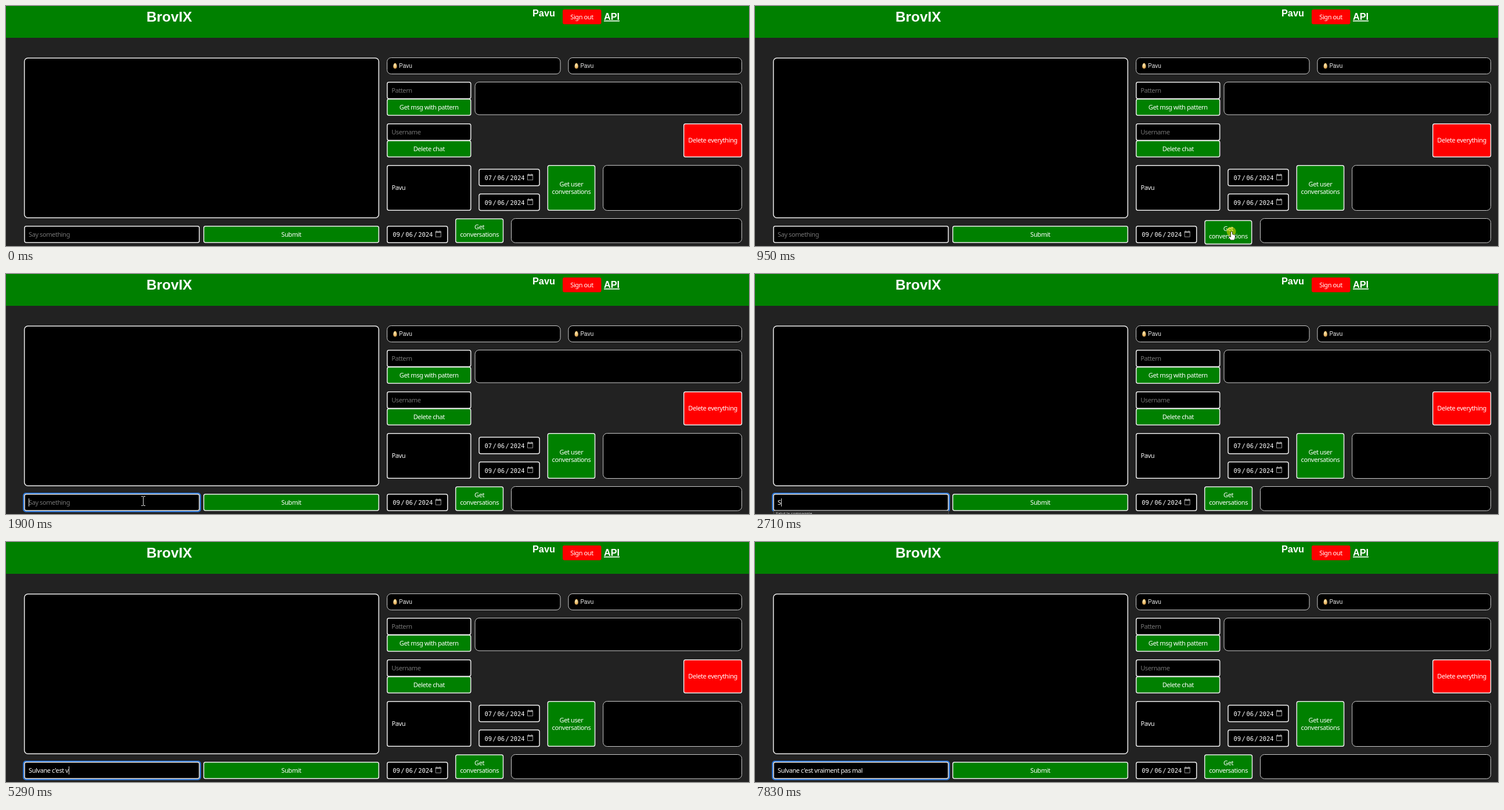
An HTML page with a canvas for the animation above (8000 ms loop, 1280 px wide and 415 px high).

```html
<!DOCTYPE html>
<html lang="en">
<head>
<meta charset="utf-8">
<title>Chat</title>
<style>
html, body { margin: 0; width: 1280px; height: 415px; overflow: hidden; background: #222; }
canvas { display: block; }
</style>
</head>
<body>
<canvas id="stage" width="1280" height="415"></canvas>
<script>
const ctx = document.getElementById('stage').getContext('2d');
const LOOP = 8000;
const GREEN = '#008000', RED = '#ff0000', GREY = '#757575', WHITE = '#fff';
const UI = '11px "Noto Sans", "Open Sans", sans-serif';
const SANS = '"Liberation Sans", Arial, sans-serif';
const MONO = '10.4px "DejaVu Sans Mono", monospace';
const USER = 'Pavu';

const MESSAGE = "Sulvane c'est vraiment pas mal";
const KEY_TIMES = [
  2640, 2840, 3040, 3240, 3440, 3570, 3900, 4030, 4230, 4430,
  4560, 4690, 4890, 5090, 5220, 5420, 5620, 5820, 6020, 6240,
  6370, 6570, 6770, 6970, 7090, 7210, 7330, 7450, 7570, 7700
];
const FOCUS = 1830, TYPING = KEY_TIMES[0];

function box(x1, y1, x2, y2, { fill = '#000', r = 3, lw = 1.5, line = '#eee' } = {}) {
  ctx.beginPath();
  ctx.roundRect(x1, y1, x2 - x1, y2 - y1, r);
  ctx.fillStyle = fill;
  ctx.fill();
  if (!lw) return;
  ctx.lineWidth = lw;
  ctx.strokeStyle = line;
  ctx.stroke();
}

function text(str, x, y, { color = WHITE, font = UI, align = 'left' } = {}) {
  ctx.font = font;
  ctx.letterSpacing = font === UI ? '-0.4px' : '0px';
  ctx.textAlign = align;
  ctx.fillStyle = color;
  ctx.fillText(str, x, y);
}

function button(x1, y1, x2, y2, lines, fill = GREEN) {
  box(x1, y1, x2, y2, { fill });
  const mid = (y1 + y2) / 2 + 4 - (lines.length - 1) * 6.5;
  lines.forEach((s, i) => text(s, (x1 + x2) / 2, Math.round(mid + i * 13), { align: 'center' }));
}

function field(x, y, hint) {
  box(x, y, x + 144, y + 28.5);
  text(hint, x + 7.5, y + 18.5, { color: GREY });
}

const panel = (x1, y1, x2, y2) => box(x1, y1, x2, y2, { r: 7, lw: 1, line: '#ccc' });

function dateField(x, y, day) {
  box(x, y, x + 104, y + 28.5);
  const base = y + 18.5, opt = { font: MONO };
  text(day, x + 9.5, base, opt);
  text('06', x + 31.5, base, opt);
  text('2024', x + 53.5, base, opt);
  text('/', x + 23.5, base, opt);
  text('/', x + 45.5, base, opt);
  const cx = x + 83, cy = y + 9;
  ctx.strokeStyle = '#999';
  ctx.lineWidth = 1;
  ctx.strokeRect(cx + 0.5, cy + 0.5, 9, 9);
  ctx.fillStyle = '#999';
  ctx.fillRect(cx, cy, 10, 2.5);
  ctx.fillRect(cx + 1.5, cy - 1.2, 1.5, 2);
  ctx.fillRect(cx + 7, cy - 1.2, 1.5, 2);
}

function eggUser(x1, x2) {
  panel(x1, 89.5, x2, 117.5);
  const x = x1 + 13.8, y = 103.5;
  const g = ctx.createRadialGradient(x - 1, y - 2, 0.5, x, y, 5.5);
  g.addColorStop(0, '#ffe7b0');
  g.addColorStop(0.6, '#e8b765');
  g.addColorStop(1, '#b57f35');
  ctx.fillStyle = g;
  ctx.beginPath();
  ctx.moveTo(x, y - 5);
  ctx.bezierCurveTo(x + 3, y - 5, x + 5.2, y + 5, x, y + 5);
  ctx.bezierCurveTo(x - 5.2, y + 5, x - 3, y - 5, x, y - 5);
  ctx.fill();
  text(USER, x1 + 20.5, 107, { font: '10px ' + SANS, color: '#eee' });
}

function header() {
  ctx.fillStyle = GREEN;
  ctx.fillRect(0, 0, 1280, 55);
  const bold = px => ({ font: `bold ${px}px ${SANS}` });
  text('BrovIX', 242, 27, bold(24.4));
  text(USER, 907, 18, bold(16.3));
  box(959, 6, 1025.5, 31.5, { fill: RED, lw: 0 });
  text('Sign out', 992, 23, { align: 'center' });
  text('API', 1030, 23.5, bold(16.3));
  ctx.fillRect(1030, 25, 27, 1.6);
}

function composer(t) {
  const focused = t >= FOCUS;
  if (focused) box(30.2, 379.2, 334.8, 410.8, { r: 4, lw: 2, line: '#2b7de9' });
  box(32, 380.7, 333, 409);
  const typed = MESSAGE.slice(0, KEY_TIMES.filter(k => k <= t).length);
  text(typed || 'Say something', 39, 399, { color: typed ? WHITE : GREY });
  if (t >= 2700 && t < 3100) {
    box(32, 409.5, 333.5, 430, { fill: '#2b2b2b', r: 0, lw: 1, line: '#555' });
    text('Salut la compagnie', 36, 417, { font: '7px "Noto Sans", sans-serif', color: '#ddd' });
  }
  const caretOn = focused && !(t >= 2380 && t < TYPING) && t < 7830;
  if (caretOn) {
    ctx.font = UI;
    ctx.letterSpacing = '-0.4px';
    const w = typed ? ctx.measureText(typed).width : 0;
    ctx.fillStyle = '#ddd';
    ctx.fillRect(Math.round(39 + w), 388, 1, 14);
  }
}

function getButton(t) {
  const down = t >= 880 && t < 1020;
  if (down) {
    box(775, 374, 856, 414, { fill: '#4a4a4a', lw: 0 });
    button(775, 371, 855.7, 411.5, ['Get', 'conversations']);
  } else {
    button(774.7, 368, 856.5, 409, ['Get', 'conversations']);
  }
}

function pathFrom(points, x, y) {
  ctx.beginPath();
  points.forEach(([px, py]) => ctx.lineTo(x + px, y + py));
  ctx.closePath();
  ctx.lineJoin = 'round';
  ctx.lineWidth = 1.2;
  ctx.strokeStyle = '#000';
  ctx.stroke();
  ctx.fillStyle = WHITE;
  ctx.fill();
}

const ARROW = [[0, 0], [0, 12], [2.8, 9.4], [4.8, 13.6], [6.6, 12.8], [4.7, 8.8], [8.4, 8.6]];
const HAND = [[-1, 0], [1, 0], [1.2, 4.5], [5, 5.5], [6, 6.8], [5.6, 11], [4.4, 14],
  [-1.5, 14], [-4.6, 9.5], [-4.4, 8], [-3, 8], [-1.2, 9.5]];

function iBeam(x, y) {
  ctx.fillStyle = '#ddd';
  ctx.fillRect(x, y - 7, 1, 15);
  ctx.fillRect(x - 3, y - 8, 3, 1);
  ctx.fillRect(x + 1, y - 8, 3, 1);
  ctx.fillRect(x - 3, y + 8, 3, 1);
  ctx.fillRect(x + 1, y + 8, 3, 1);
}

const clamp = v => Math.min(1, Math.max(0, v));
const lerp = (a, b, p) => a + (b - a) * p;
const stepped = (t, start, len, n) => clamp(Math.floor((t - start) / len) / n);

function pointer(t) {
  if (t < 190 || t >= TYPING) return;
  const a = 1 - (1 - stepped(t, 190, 76, 9)) ** 2;
  const q = stepped(t, 1350, 70, 4);
  const b = q * q * (3 - 2 * q);
  const x = lerp(lerp(1129, 821, a), 236, b);
  const y = lerp(lerp(402, 390.5, a), 392, b);

  const clicked = (t >= 880 && t < 1090) || (t >= FOCUS && t < 1900);
  if (clicked) {
    ctx.fillStyle = t >= 1020 && t < 1090 ? 'rgba(255,240,0,.25)' : 'rgba(255,230,0,.5)';
    ctx.beginPath();
    ctx.arc(x - 0.5, y - 0.5, 8, 0, Math.PI * 2);
    ctx.fill();
  }
  if (x < 333) iBeam(Math.round(x), Math.round(y));
  else if ((x > 774 && x < 857) || (x > 340 && x < 643)) pathFrom(HAND, x, y);
  else pathFrom(ARROW, x, y);
}

function draw(t) {
  ctx.fillStyle = '#222';
  ctx.fillRect(0, 0, 1280, 415);
  header();

  box(31.7, 90, 642.2, 366.2, { r: 6 });
  eggUser(656.5, 955);
  eggUser(968.9, 1267.5);

  field(656.7, 131.8, 'Pattern');
  button(656.7, 161, 800.7, 189, ['Get msg with pattern']);
  panel(808, 131.5, 1267.5, 188);

  field(656.7, 203.8, 'Username');
  button(656.7, 233, 800.7, 261, ['Delete chat']);
  button(1167.7, 203.8, 1267.5, 261, ['Delete everything'], RED);

  box(656.7, 275.7, 800.7, 353.3);
  text(USER, 664.5, 318);
  dateField(815, 282.3, '07');
  dateField(815, 325, '09');
  button(933.3, 275.7, 1014.6, 353.3, ['Get user', 'conversations']);
  panel(1028.7, 275.5, 1267.5, 353.5);

  button(340.7, 380.7, 642.2, 409, ['Submit']);
  dateField(656.7, 380.7, '09');
  panel(870.5, 367.5, 1267.5, 409.3);
  getButton(t);
  composer(t);
  pointer(t);
}

const start = performance.now();
function tick() {
  draw((performance.now() - start) % LOOP);
  requestAnimationFrame(tick);
}
tick();
</script>
</body>
</html>
```
